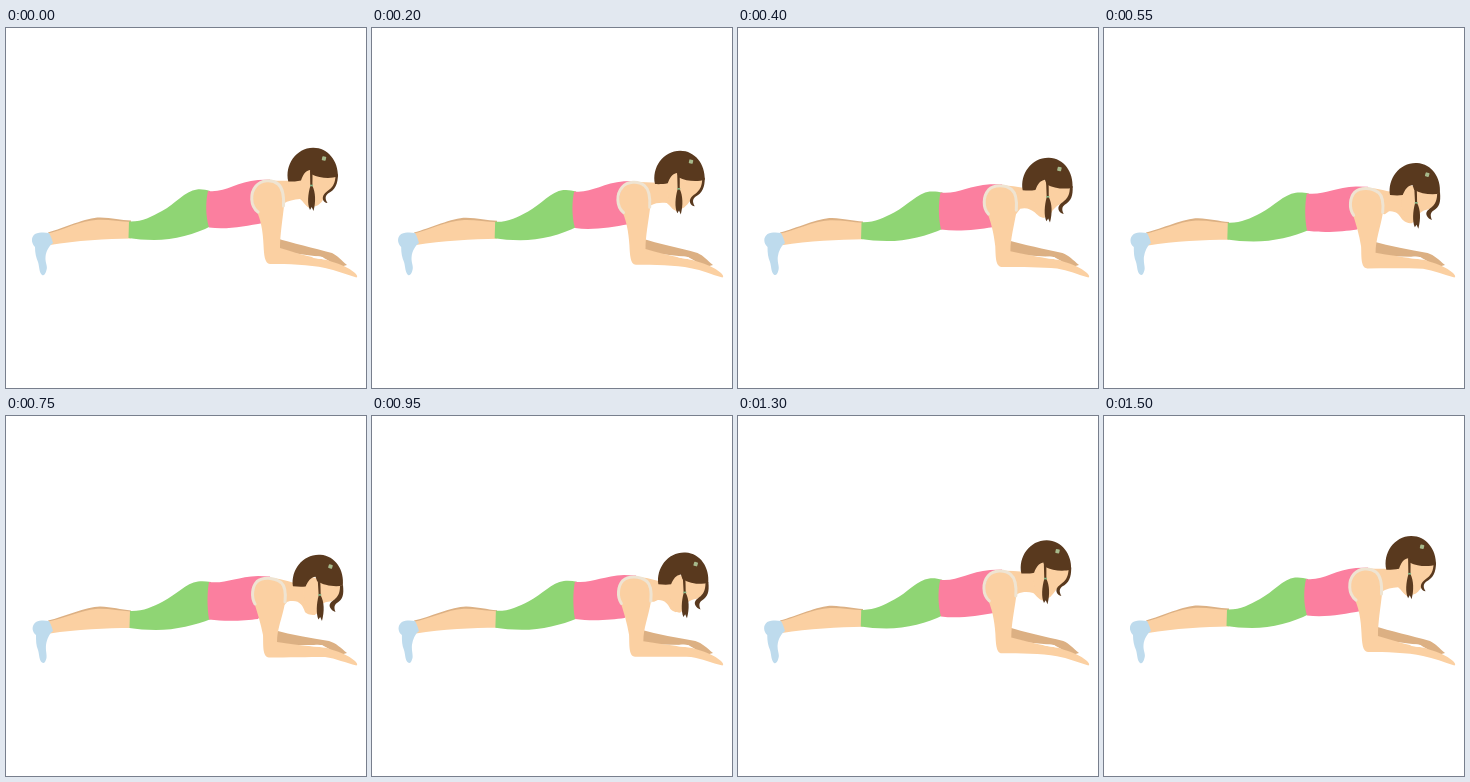
Recreate the animation shown at these times as an HTML page. Size 360 by 360 pixels, loop 1550 ms.

```html
<!DOCTYPE html>
<html lang="en">
<head>
<meta charset="utf-8">
<title>Plank exercise</title>
<style>
  html, body { margin: 0; width: 100%; height: 100%; overflow: hidden; background: #fff; }
  svg { display: block; width: 100%; height: 100%; }
</style>
</head>
<body>
<svg id="stage" viewBox="0 0 360 360"></svg>
<script>
const LOOP = 1550, STEP = 50;
const SKIN = '#fbd0a2', SHADE = '#dcb083', HAIR = '#59391e', CREAM = '#efe4d2';
const stage = document.getElementById('stage');
const parts = [];

function node(parent, tag, attrs) {
  const el = document.createElementNS('http://www.w3.org/2000/svg', tag);
  for (const k in attrs) el.setAttribute(k, attrs[k]);
  return parent.appendChild(el);
}

// Blends two paths that have the same commands.
function mix(a, b, p) {
  const to = b.match(/-?[\d.]+/g);
  let i = 0;
  return a.replace(/-?[\d.]+/g, n => (+n + (to[i++] - n) * p).toFixed(2));
}

function part(attrs, high, low = high) {
  parts.push({ el: node(stage, 'path', attrs), high, low });
}

const fill = c => ({ fill: c });

// far arm and far leg
part(fill(SHADE),
  'M270 210 C286 215 308 220 326 225 C332 228 335 232 341 237 L334 239 C326 235 322 232 316 229 L270 223Z',
  'M268 214 C286 219 305 222 323 225 C330 227 335 232 341 237 L334 239 C326 235 322 232 316 229 L268 229Z');
part(fill(SHADE),
  'M42 204.5 C58 200 80 189.5 94 189.5 C106 190 115 192 125 192.5 L125 198 L44 208Z',
  'M42 204.5 C58 201 80 190.5 94 190.5 C106 191 115 193.5 125 194.5 L125 200 L44 208Z');

// near leg and sock
part(fill(SKIN),
  'M40 206 C58 202 74 192.5 92 191.8 C104 191.5 114 193.5 125 194 L125 210.5 C101 211 70 212.5 44 217Z',
  'M40 206 C58 203 74 194 92 192.8 C104 192.5 114 195 125 195.5 L125 212 C101 212 70 213.5 44 217.5Z');
part(fill('#bedbed'),
  'M29 206 C34 204 39 204.5 43 205 C45 208 46 212 47 215 C43 218 40 223 39.5 229 C39 235 42 238 40.5 242 C39.5 246 38 248 36 247 C33 244 33.5 239 32 234 C30 229 29 225 29 219 C26 216 24 210 29 206Z',
  'M30 206 C34 204 39 204.5 43 205 C45 208 46 212 47 215 C43 218 41 223 40 229 C39.5 235 41 238 40.5 242 C39.5 246 38 248 36 246.5 C33 244 33.5 239 32 234 C30 229 30 225 30 219 C26 216 25 210 30 206Z');

// leggings
part(fill('#8fd574'),
  'M123 193.5 C136 194 145 189 156 183 C169 176 179 163 191 161.5 C196 161 200 162 204 163 L205 198 C190 206 168 212 148 212 C138 212 130 211 122.5 210Z',
  'M124 195 C137 195.5 146 191 157 185.5 C170 179 180 167 192 165.5 C197 165 201 165.5 205 166 L205 203 C190 209 170 214 150 214 C140 214 131 213 123.5 212Z');

// top
part(fill('#fb7f9f'),
  'M202 163 C219 165 230 154 252 152 L264 151.5 L270 175 L257 195 C240 198 221 202 203 199.5 C199.5 188 199.5 174 202 163Z',
  'M203 166 C219 168 230 161 252 160 L264 160.5 L270 180 L252 203 C240 204.5 221 206 203 203.5 C201 191 201 177 203 166Z');

// neck and shoulder
part(fill(SKIN),
  'M257 152.5 C270 152 280 153.5 292 152 L300 146 L308 160 L304 180 C300 179 298 174 294 171 C288 171.5 282 172.5 277 176 L268 192 L252 184 C243 172 246 155 257 152.5Z',
  'M258 161.5 C270 161.5 279 164 291 168 L302 165 L314 180 L309 199 C303 199 301 198 299 196 C297 190 294 185 287 185 C284 185 281 186 279.5 189 L270 198 L250 192 C243 178 247 163 258 161.5Z');

// near arm
part(fill(SKIN),
  'M249 180 C255 190 257 204 257.5 217 C258 226 258.5 236 264 236 C282 236 303 236.5 319 240 C330 242 340 246.5 350.5 249.5 C352 248.5 351 247 349 245 C342 239 334 236 325 233.5 C320 231 314 231 308 229.5 C297 227 285 223.5 274 220 C274 207 276.5 192 278 178 C279 162 272 152.5 262 152.5 C250 152.5 244 168 249 180Z',
  'M247 183 C251 195 255 208 257 219 C257.5 228 256 241 263 241.5 C282 241.5 303 241 319 241 C330 242.5 340 247 350.5 249.5 C352 248.5 351 247 349 245 C342 239 334 236 325 233.5 C320 231 314 231 308 230.5 C297 229.5 285 228 271 226 C271 213 276 203 279 187 C281 171 272 162 262 162 C251 162 245 172 247 183Z');
part(fill('#fff'),
  'M306 229.5 C311 227.5 317 228 319 231.5 C314 231 310 230.5 306 229.5Z',
  'M304 230 C310 228 317 228 319 231.5 C314 231 310 230.5 304 230Z');

// armhole trim
part({ fill: 'none', stroke: CREAM, 'stroke-width': 3, 'stroke-linecap': 'round' },
  'M252 184 C244 178 244 165 250 158 C255 152 266 151 272 156 C277 160 278 168 277.5 178',
  'M249 188 C245 181 246 171 251 165.5 C257 160.5 268 161.5 275 166.5 C279 170 280 177 279 186');

// face
part(fill(SKIN),
  'M296 140 L331 146 C331 153 328 160 322 165 C318 168 318 172 314 175.5 C311 178.5 306 179.5 302 179 C297 174 294 164 294 152Z',
  'M302 160 L336.5 169 C336 178 331 184 324 185.5 C319 186 317 187 315 189 C314 194 312 198 309 198.5 C300 198 297 184 298 172Z');

// head of hair
const head = node(stage, 'g', {});
node(head, 'path', { fill: HAIR, d: 'M282.3 153.5 C278.5 137 290 120 307 119.7 C322 119.5 332.3 133 332 148.5 C324 151 313 150 306 146.5 L304 142 C299 143 297 147 295 152.5 C291 153.5 287 153.5 282.3 153.5Z' });
node(head, 'rect', { x: 316, y: 128.5, width: 4, height: 4, rx: 0.8, fill: '#a6b98b', transform: 'rotate(12 318 130.5)' });

// loose hair
part(fill(HAIR),
  'M304 142 L306.3 143 C306.8 149 306.3 154 306.5 158 C309.5 164 310 174 307.5 183 L305.7 179 L304 182 C301 176 302 166 304.3 158Z',
  'M311.7 163 L314.2 164.5 C314.7 170 314.5 175 314.8 179.5 C318.2 186 318.7 195 316 205 L314.2 201 L312.5 203.5 C310 198 310.5 187 312.7 179.5Z');
part(fill(HAIR),
  'M332 146 C332 156 329 162 322 165.5 C319 168 319 171 321.5 175 C317 174.5 315.5 170 318 166.5 C321 162 329 161 329.5 148Z',
  'M337 169 C338 179 337 183 331 187 C328 189 328 192 329.5 196 C325 194.5 322 190 324.5 187 C328 183 334 182 334 170Z');
part({ fill: 'none', stroke: '#86b98a', 'stroke-width': 1.6 }, 'M304 157.5 L307 157.5', 'M312.3 179 L315.3 179');

function draw(ms) {
  const t = Math.floor((ms % LOOP) / STEP) * STEP;
  const p = (1 - Math.cos(2 * Math.PI * t / LOOP)) / 2;
  for (const { el, high, low } of parts) el.setAttribute('d', mix(high, low, p));
  head.setAttribute('transform', `translate(${5 * p} ${19 * p}) rotate(${5 * p} 307 148)`);
}

const start = performance.now();
function tick() {
  draw(performance.now() - start);
  requestAnimationFrame(tick);
}
tick();
</script>
</body>
</html>
```
